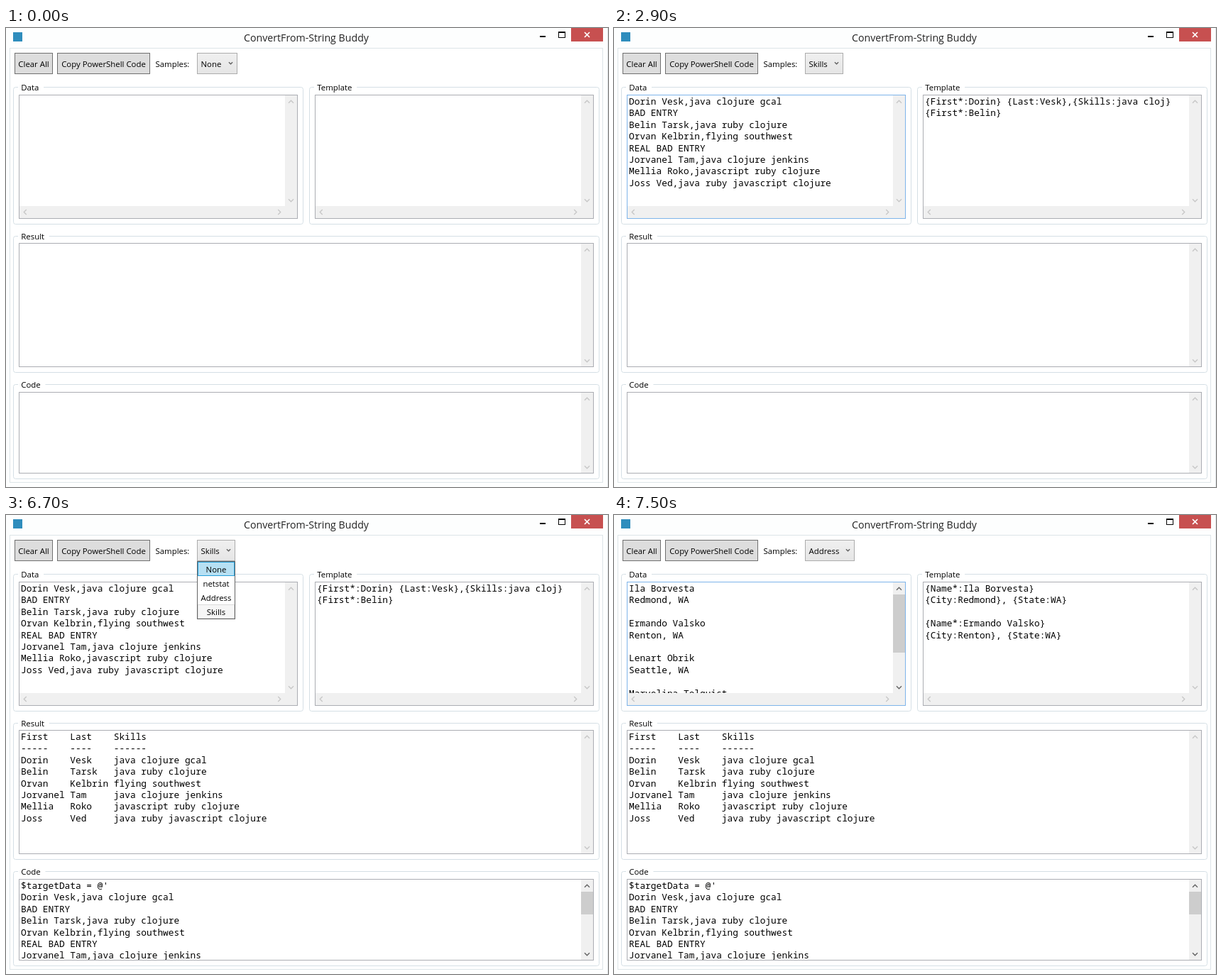
Write an HTML page with a canvas that moves like this. It is 848 by 647 pixels and loops after 8 s.

```html
<!DOCTYPE html>
<html lang="en">
<head>
<meta charset="utf-8">
<title>ConvertFrom-String Buddy</title>
<style>
html, body { margin: 0; width: 100%; height: 100%; overflow: hidden; background: #fdfefe; }
canvas { display: block; width: 848px; height: 647px; }
</style>
</head>
<body>
<canvas id="stage" width="848" height="647"></canvas>
<script>
const ctx = document.getElementById('stage').getContext('2d');
const UI = '11.4px "Open Sans", sans-serif';
const TITLE = '14.2px "Open Sans", sans-serif';
const MONO = '12.83px "Noto Sans Mono", monospace';
const LOOP = 8000, LINE_HEIGHT = 16.39;
const BLUE = '#7eb4ea', GREY = '#abadb3', TRACK = '#f0f0f0';

const people = [
  ['Dorin', 'Vesk', 'java clojure gcal'],
  ['Belin', 'Tarsk', 'java ruby clojure'],
  ['Orvan', 'Kelbrin', 'flying southwest'],
  ['Jorvanel', 'Tam', 'java clojure jenkins'],
  ['Mellia', 'Roko', 'javascript ruby clojure'],
  ['Joss', 'Ved', 'java ruby javascript clojure']
];
const skillsData = people.map(([first, last, skills]) => `${first} ${last},${skills}`);
skillsData.splice(3, 0, 'REAL BAD ENTRY');
skillsData.splice(1, 0, 'BAD ENTRY');
const skillsTemplate = ['{First*:Dorin} {Last:Vesk},{Skills:java cloj}', '{First*:Belin}'];
const addressData = ['Ila Borvesta', 'Redmond, WA', '', 'Ermando Valsko', 'Renton, WA', '',
  'Lenart Obrik', 'Seattle, WA', '', 'Marvelina Tolquist'];
const addressTemplate = ['{Name*:Ila Borvesta}', '{City:Redmond}, {State:WA}', '',
  '{Name*:Ermando Valsko}', '{City:Renton}, {State:WA}'];
const resultLines = [['First', 'Last', 'Skills'], ['-----', '----', '------'], ...people]
  .map(([first, last, skills]) => first.padEnd(9) + last.padEnd(8) + skills);
const codeLines = ["$targetData = @'", ...skillsData];

const menuItems = ['None', 'netstat', 'Address', 'Skills'];
const comboWidths = { None: 57, Skills: 54, Address: 70 };

// Each step overrides part of the state from its time on.
const steps = [
  [0, { sample: 'None', data: [], template: [], result: [], code: [],
        comboHot: false, dataHot: false, menuOpen: false, hover: -1, focusDots: false }],
  [1000, { comboHot: true }],
  [1100, { menuOpen: true }],
  [1400, { comboHot: false, hover: 1, focusDots: true }],
  [1500, { hover: 2 }],
  [1600, { hover: 3 }],
  [2900, { menuOpen: false, hover: -1, focusDots: false, sample: 'Skills',
           data: skillsData, template: skillsTemplate, dataHot: true }],
  [4300, { dataHot: false, comboHot: true, result: resultLines, code: codeLines }],
  [6300, { menuOpen: true }],
  [6700, { comboHot: false, hover: 0 }],
  [6800, { hover: 1 }],
  [6900, { hover: 2 }],
  [7400, { menuOpen: false, hover: -1 }],
  [7500, { sample: 'Address', data: addressData, template: addressTemplate, dataHot: true }]
];
const stateAt = time => Object.assign({}, ...steps.filter(([start]) => start <= time).map(([, change]) => change));

function fill(x, y, w, h, color) {
  ctx.fillStyle = color;
  ctx.fillRect(x, y, w, h);
}

function frame(x, y, w, h, background, border) {
  fill(x, y, w, h, background);
  ctx.strokeStyle = border;
  ctx.lineWidth = 1;
  ctx.strokeRect(x + .5, y + .5, w - 1, h - 1);
}

function text(string, x, y, font = UI, align = 'left', color = '#000') {
  ctx.font = font;
  ctx.textAlign = align;
  ctx.fillStyle = color;
  ctx.fillText(string, x, y);
}

function chevron(x, y, angle, color, size = 3.5) {
  ctx.save();
  ctx.translate(x, y);
  ctx.rotate(angle);
  ctx.beginPath();
  ctx.moveTo(-size, size / 2);
  ctx.lineTo(0, -size / 2);
  ctx.lineTo(size, size / 2);
  ctx.strokeStyle = color;
  ctx.lineWidth = 1.3;
  ctx.stroke();
  ctx.restore();
}

function group(label, x, y, w, h) {
  ctx.strokeStyle = '#d5dfe5';
  ctx.lineWidth = 1;
  ctx.beginPath();
  ctx.roundRect(x + .5, y + .5, w - 1, h - 1, 3);
  ctx.stroke();
  ctx.font = UI;
  fill(x + 7, y - 1, ctx.measureText(label).width + 11, 3, '#fff');
  text(label, x + 11.3, y + 5);
}

function textBox(x, y, w, h, lines, { horizontal = false, hot = false, thumb = 0 } = {}) {
  const right = x + w, bottom = y + h - (horizontal ? 18 : 1);
  frame(x, y, w, h, '#fff', hot ? BLUE : GREY);
  fill(right - 18, y + 1, 17, h - 2, TRACK);
  const arrow = thumb ? '#606060' : '#c6c6c6';
  chevron(right - 9.5, y + 10, 0, arrow);
  chevron(right - 9.5, bottom - 8, Math.PI, arrow);
  if (thumb) fill(right - 18, y + 18, 17, thumb, '#cdcdcd');
  if (horizontal) {
    fill(x + 1, bottom, w - 2, 17, TRACK);
    chevron(x + 9, bottom + 8.5, -Math.PI / 2, '#c6c6c6');
    chevron(right - 26, bottom + 8.5, Math.PI / 2, '#c6c6c6');
  }
  ctx.save();
  ctx.beginPath();
  ctx.rect(x + 1, y + 1, w - 19, bottom - y - 1);
  ctx.clip();
  lines.forEach((line, i) => text(line, x + 3, Math.round(y + 14 + i * LINE_HEIGHT), MONO));
  ctx.restore();
}

function titleBar() {
  fill(10, 6, 13, 13, '#2f8dbd');
  text('ConvertFrom-String Buddy', 423, 19, TITLE, 'center', '#222');
  fill(752, 11, 8, 2, '#000');
  frame(778, 5, 10, 9, '#fdfefe', '#000');
  fill(778, 5, 10, 2, '#000');
  fill(796, 0, 45, 19, '#c75050');
  ctx.strokeStyle = '#fff';
  ctx.lineWidth = 1.7;
  ctx.beginPath();
  for (const d of [-1, 1]) {
    ctx.moveTo(815, 9.5 - 3.5 * d);
    ctx.lineTo(822, 9.5 + 3.5 * d);
  }
  ctx.stroke();
}

function button(label, x, w) {
  frame(x, 35, w, 30, '#ddd', '#707070');
  text(label, x + w / 2, 55, UI, 'center');
}

function combo({ sample, comboHot }) {
  const w = comboWidths[sample];
  const shade = ctx.createLinearGradient(0, 35, 0, 65);
  shade.addColorStop(0, comboHot ? '#ecf4fc' : '#f0f0f0');
  shade.addColorStop(1, comboHot ? '#dcecfc' : '#e5e5e5');
  frame(269, 35, w, 30, shade, comboHot ? BLUE : '#acacac');
  text(sample, 274.5, 55);
  chevron(269 + w - 9.5, 49.5, Math.PI, comboHot ? '#000' : '#606060', 2.6);
}

function menu({ sample, hover, focusDots }) {
  const w = comboWidths[sample];
  frame(269, 65, w, 82, '#fff', '#646464');
  menuItems.forEach((item, i) => {
    const y = 66 + i * 20;
    if (i === hover) frame(270, y, w - 2, 20, '#b7e0f3', '#26a0da');
    else if (item === sample) {
      if (hover < 0) frame(270, y, w - 2, 20, '#cbe8f6', '#26a0da');
      else frame(270, y, w - 2, 20, '#f6f6f6', '#dadada');
    }
    if (i === hover && focusDots) {
      ctx.setLineDash([1, 1]);
      ctx.strokeStyle = '#222';
      ctx.strokeRect(271.5, y + 1.5, w - 5, 17);
      ctx.setLineDash([]);
    }
    text(item, 269 + w / 2, y + 15, UI, 'center');
  });
}

function draw(state) {
  fill(0, 0, 848, 647, '#fdfefe');
  fill(847, 0, 1, 647, '#e3e8ea');
  frame(5, 28, 836, 613, '#fff', '#dde5e8');
  titleBar();
  button('Clear All', 12, 54);
  button('Copy PowerShell Code', 72, 131);
  text('Samples:', 210.5, 55);
  combo(state);
  group('Data', 10, 83, 409, 194);
  group('Template', 427, 83, 409, 194);
  group('Result', 10, 293, 826, 193);
  group('Code', 10, 502, 826, 134);
  textBox(18, 94, 393, 175, state.data,
    { horizontal: true, hot: state.dataHot, thumb: state.data === addressData ? 82 : 0 });
  textBox(435, 94, 393, 175, state.template, { horizontal: true });
  textBox(18, 303, 810, 175, state.result);
  textBox(18, 513, 810, 115, state.code, { thumb: state.code.length ? 32 : 0 });
  if (state.menuOpen) menu(state);
}

const start = performance.now();
function tick() {
  draw(stateAt((performance.now() - start) % LOOP));
  requestAnimationFrame(tick);
}
tick();
</script>
</body>
</html>
```
